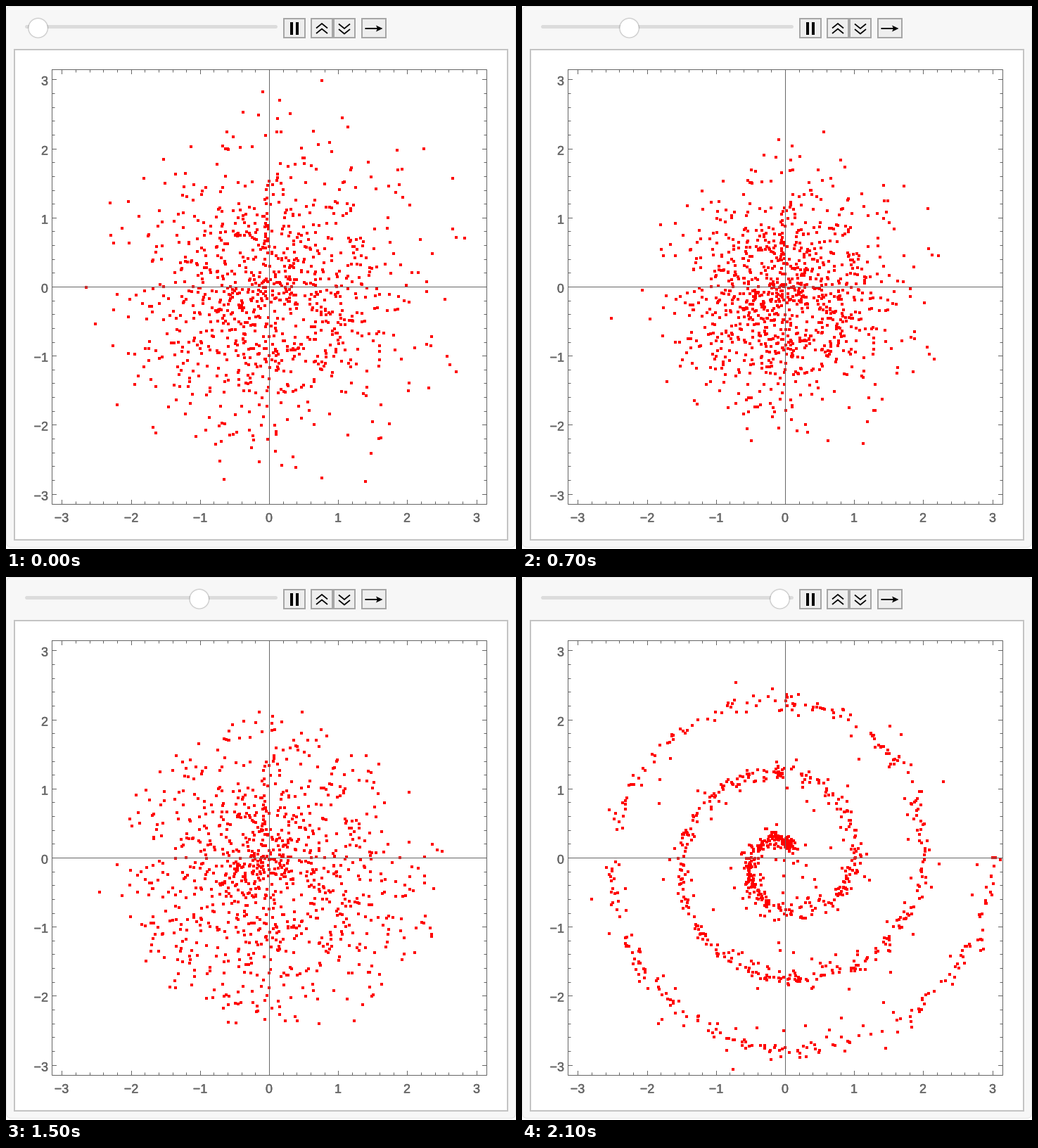
Recreate the animation shown at these times as a matplotlib script. Size 725 px wide and 772 px high, loop 2.2 s.

```python
import numpy as np
import matplotlib.pyplot as plt
from matplotlib.animation import FuncAnimation
from matplotlib.patches import Circle, FancyBboxPatch, Polygon, Rectangle
from matplotlib.patheffects import withStroke

W, H, DPI = 725, 772, 100
PX = 72 / DPI                      # points per pixel
CX, CY, UNIT = 374.5, 399.5, 98.2  # plot origin and scale
LEFT, RIGHT, TOP, BOTTOM = 65.5, 683.5, 90.5, 708.5
FRAMES, COUNT, SUB = 22, 1000, 4
GRAY = "#666666"


def spiral(n=320):
    a = np.linspace(1, 6 * np.pi, n)
    return (a / (2 * np.pi))[:, None] * np.column_stack([np.cos(a), np.sin(a)])


def velocity(p, s, target, noise):
    """Flow-matching velocity from a unit normal to the noisy spiral."""
    var = (1 - s) ** 2 + (s * noise) ** 2
    q = s * target
    d2 = (p ** 2).sum(1)[:, None] + (q ** 2).sum(1) - 2 * p @ q.T
    w = np.exp(-(d2 - d2.min(1, keepdims=True)) / (2 * var))
    mean = (w / w.sum(1, keepdims=True)) @ target
    return mean + (s * noise ** 2 - (1 - s)) / var * (p - s * mean)


def flow():
    rng = np.random.default_rng(7)
    target, p = spiral(), rng.normal(size=(COUNT, 2))
    # Uneven noise leaves some stragglers between the arms.
    noise = 0.065 * np.exp(0.7 * rng.normal(size=(COUNT, 1)))
    steps = SUB * (FRAMES - 1)
    path = [p]
    for k in range(steps):
        p = p + velocity(p, (k + 0.5) / steps, target, noise) / steps
        if (k + 1) % SUB == 0:
            path.append(p)
    return path


fig = plt.figure(figsize=(W / DPI, H / DPI), dpi=DPI, facecolor="white")
ax = fig.add_axes([0, 0, 1, 1])
ax.set(xlim=(0, W), ylim=(H, 0))
ax.axis("off")


def line(xs, ys, color=GRAY, width=1, **kw):
    style = dict(solid_capstyle="butt", solid_joinstyle="miter") | kw
    ax.plot(xs, ys, color=color, lw=width * PX, zorder=5, snap=False, **style)


def box(x0, y0, x1, y1, face, edge, width=2):
    ax.add_patch(Rectangle((x0, y0), x1 - x0, y1 - y0, fc=face, ec=edge,
                           lw=width * PX, joinstyle="miter", snap=False))


def label(x, y, v, ha):
    ax.text(x, y, str(v).replace("-", "\u2212"), ha=ha, va="center_baseline",
            color=GRAY, fontsize=18 * PX, family="Liberation Sans",
            path_effects=[withStroke(linewidth=0.4 * PX, foreground=GRAY)])


def draw_panel():
    ax.add_patch(FancyBboxPatch((0.5, 0.5), W - 1, 769, fc="#f7f7f7",
                                ec="#e6e6e6", lw=PX,
                                boxstyle="round,pad=0,rounding_size=7"))
    box(12, 62, 713, 759, "white", "#c4c4c4")
    line([29.5, 383.5], [29.5, 29.5], "#dcdcdc", 5, solid_capstyle="round")


def draw_buttons():
    for x0, x1 in ((394, 426), (433, 465), (465, 497), (505, 541)):
        box(x0 + 1, 18, x1 - 1, 45, "#eeeeee", "#a6a6a6")
    for x in (404, 412):
        ax.add_patch(Rectangle((x, 23), 4, 18, fc="black", lw=0, zorder=6))
    for cx, tip, base in ((449, 25, 31.5), (449, 32.5, 39),
                          (481, 32, 25.5), (481, 39.5, 33)):
        line([cx - 8, cx, cx + 8], [base, tip, base], "black", 1.8)
    line([510.5, 530], [32, 32], "black", 2)
    ax.add_patch(Polygon([(535.5, 32), (526, 27.5), (528, 32), (526, 36.5)],
                         fc="black", lw=0, zorder=6))


def draw_plot_frame():
    line([LEFT, RIGHT, RIGHT, LEFT, LEFT], [TOP, TOP, BOTTOM, BOTTOM, TOP])
    line([CX, CX], [TOP, BOTTOM])
    line([LEFT, RIGHT], [CY, CY])
    for k in range(-15, 16):
        size = 4 if k % 5 else 6.5
        # Pixel centres keep the ticks crisp.
        x = np.floor(CX + k / 5 * UNIT) + 0.5
        y = np.floor(CY - k / 5 * UNIT) + 0.5
        for edge, d in ((TOP, size), (BOTTOM, -size)):
            line([x, x], [edge, edge + d])
        for edge, d in ((LEFT, size), (RIGHT, -size)):
            line([edge, edge + d], [y, y])
        if k % 5 == 0:
            label(x - 0.5, 727, k // 5, "center")
            label(60, y + 1.5, k // 5, "right")


draw_panel()
draw_buttons()
draw_plot_frame()

path = flow()
dots = ax.plot([], [], "s", color="red", ms=4 * PX, mew=0, zorder=4)[0]
dots.set_clip_path(Rectangle((LEFT, TOP), RIGHT - LEFT, BOTTOM - TOP,
                             transform=ax.transData))

# Slider thumb: soft shadow rings below a white disc.
thumb = [ax.add_patch(Circle((0, 0), r, fc="black", alpha=a, lw=0, zorder=7))
         for r, a in ((15.2, 0.03), (14.6, 0.05), (14, 0.14))]
thumb.append(ax.add_patch(Circle((0, 0), 13.2, fc="white", lw=0, zorder=8)))


def update(i):
    p = path[i]
    dots.set_data(CX + UNIT * p[:, 0], CY - UNIT * p[:, 1])
    for part in thumb:
        part.center = (45.6 + 15.28 * i, 31.3)
    return [dots, *thumb]


anim = FuncAnimation(fig, update, frames=FRAMES, interval=100,
                     repeat=True, repeat_delay=0, blit=False)
plt.show()
```
